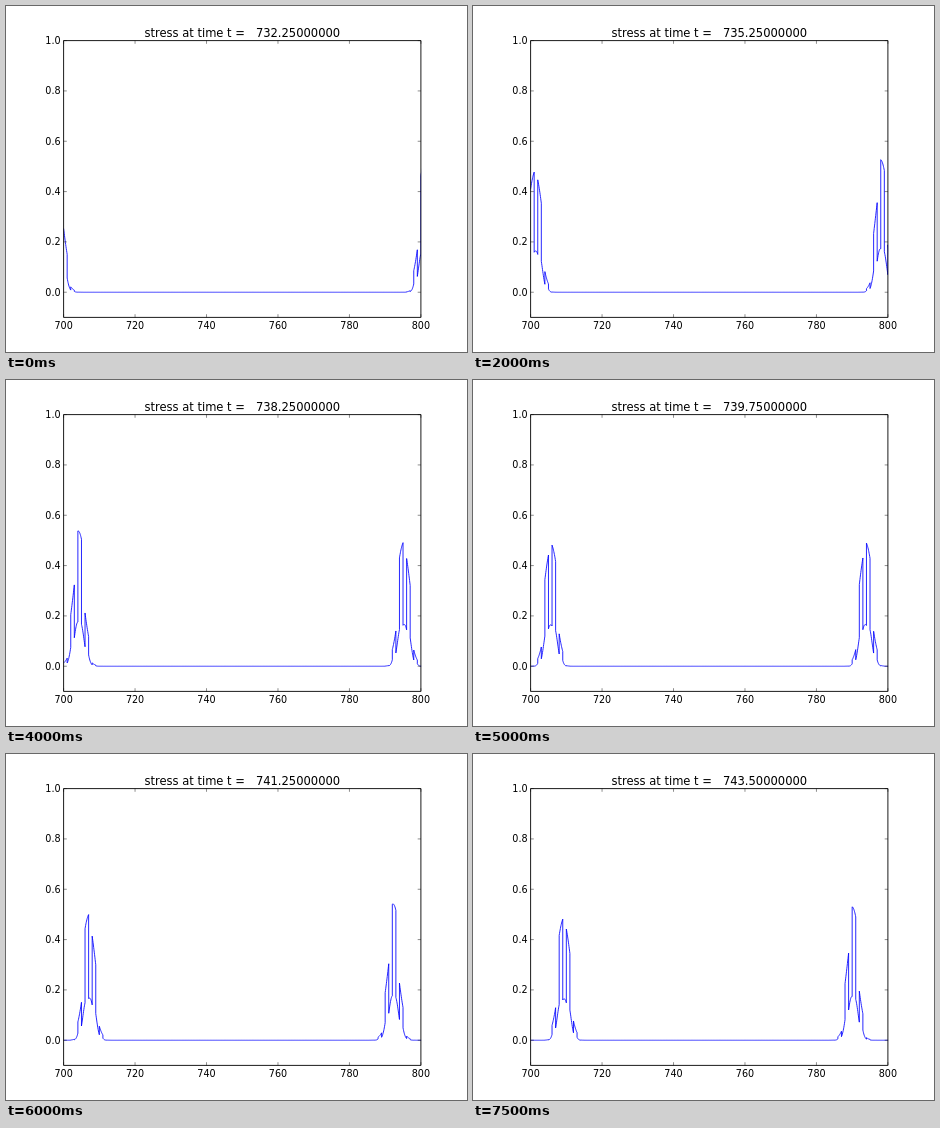
An HTML page for the animation above (8000 ms loop, 461x346 px).

```html
<!DOCTYPE html>
<html lang="en">
<head>
<meta charset="utf-8">
<title>Stress pulses in a layered medium</title>
<style>
html, body { margin: 0; width: 100%; height: 100%; overflow: hidden; background: #fff; }
svg { display: block; width: 100%; height: 100%; }
text { font-family: "DejaVu Sans", sans-serif; font-size: 9.6px; fill: #000; white-space: pre; }
#title { font-size: 11.52px; }
path { fill: none; stroke: #000; }
#wave { stroke: #00f; stroke-width: .85; stroke-linejoin: round; }
#ticks { stroke-width: .45; }
#box { stroke-width: .9; }
</style>
</head>
<body>
<svg viewBox="0 0 461 346">
  <clipPath id="area"><rect x="57.4" y="34.6" width="357.7" height="276.8"/></clipPath>
  <path id="wave" clip-path="url(#area)"/>
  <path id="ticks"/>
  <path id="box" d="M57.6 34.6H414.9V311.4H57.6Z"/>
  <g id="labels"></g>
  <text id="title" x="236.3" y="30.7" text-anchor="middle"></text>
</svg>
<script>
const LEFT = 57.6, RIGHT = 414.9, TOP = 34.6, BOTTOM = 311.4;
const STEP_MS = 500, STEPS = 16, T0 = 732.25, DT = 0.75;
const byId = id => document.getElementById(id);
const px = x => LEFT + (x - 700) / 100 * (RIGHT - LEFT);
const py = y => BOTTOM - (y + 0.1) / 1.1 * (BOTTOM - TOP);

function label(str, x, y, anchor) {
  const el = document.createElementNS("http://www.w3.org/2000/svg", "text");
  el.setAttribute("x", x);
  el.setAttribute("y", y);
  el.setAttribute("text-anchor", anchor);
  el.textContent = str;
  byId("labels").append(el);
}

function drawAxes() {
  let d = "";
  for (let i = 0; i <= 5; i++) {
    const x = px(700 + 20 * i), y = py(i / 5);
    d += `M${x} ${BOTTOM}v-3.2M${x} ${TOP}v3.2M${LEFT} ${y}h3.2M${RIGHT} ${y}h-3.2`;
    label(700 + 20 * i, x, 323.2, "middle");
    label((i / 5).toFixed(1), 54.6, y + 3.4, "end");
  }
  byId("ticks").setAttribute("d", d);
}

// Travel coordinate: odd layers are slow (1.45 long), even layers fast (0.55).
const SLOW = 1.45;
function travel(x) {
  const odd = 2 * Math.floor((x - 1) / 2) + 1, u = x - odd;
  return odd + (u < 1 ? u * SLOW : SLOW + (u - 1) * (2 - SLOW));
}

// The pulse is tall while centred in a fast layer, flatter in a slow one.
function pulse(x, c) {
  const q = (1 + Math.cos(Math.PI * (c - 702.72))) / 2;
  const d = Math.abs(travel(x) - c);
  return (0.163 + 0.015 * q) * Math.exp(-(0.115 + 0.098 * q) * d ** (2.5 - 0.5 * q));
}

function wavePath(t) {
  const c = 703.02 + 0.965 * (t - 736.75);
  const pts = [], n = 12;
  for (let layer = 700; layer <= 800; layer++) {
    for (let i = 0; i <= n; i++) {
      const x = layer + i / n;
      const e = pulse(x, c) + pulse(1499 - x, c - 0.46);
      const y = layer % 2 ? e : e * (2.48 + 3.3 * e);
      pts.push(px(x).toFixed(2) + " " + py(y).toFixed(2));
    }
  }
  return "M" + pts.join("L");
}

let shown = -1;
function frame(now) {
  const step = Math.floor(now / STEP_MS) % STEPS;
  if (step !== shown) {
    shown = step;
    const t = T0 + DT * step;
    byId("title").textContent = "stress at time t =\u00a0\u00a0\u00a0" + t.toFixed(8);
    byId("wave").setAttribute("d", wavePath(t));
  }
  requestAnimationFrame(frame);
}

drawAxes();
frame(performance.now());
</script>
</body>
</html>
```
